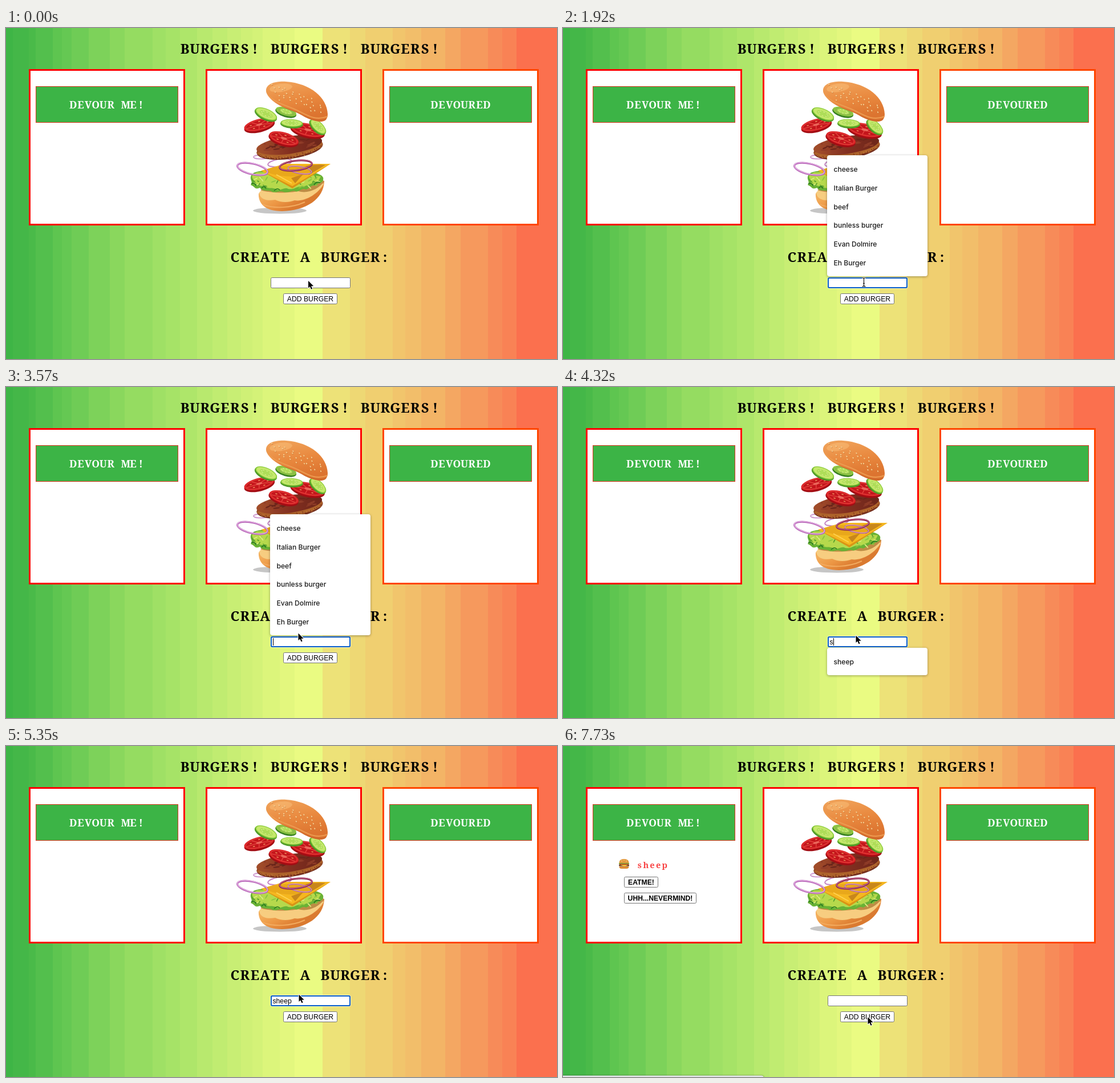
An HTML page with a canvas for the animation above (8000 ms loop, 966 by 580 pixels).

```html
<!DOCTYPE html>
<html lang="en">
<head>
<meta charset="utf-8">
<title>Burgers</title>
<style>
html, body { margin: 0; width: 100%; height: 100%; overflow: hidden; }
canvas { display: block; }
</style>
</head>
<body>
<canvas id="stage" width="966" height="580"></canvas>
<script>
const W = 966, H = 580, LOOP = 8000;
const stage = document.getElementById('stage');
const page = document.createElement('canvas');
page.width = W;
page.height = H;
let c = page.getContext('2d');

const SLAB = '"Noto Serif", serif';
const SANS = '"Liberation Sans", Arial, sans-serif';
const UI = 'Inter, Roboto, sans-serif';

// ---- helpers ----
function rect(x, y, w, h, fill) {
  c.fillStyle = fill;
  c.fillRect(x, y, w, h);
}

function rounded(x, y, w, h, r, fill, stroke, line = 1) {
  c.beginPath();
  c.roundRect(x, y, w, h, r);
  if (fill) { c.fillStyle = fill; c.fill(); }
  if (stroke) { c.strokeStyle = stroke; c.lineWidth = line; c.stroke(); }
}

function text(s, x, y, font, fill = '#000', align = 'left') {
  c.font = font;
  c.fillStyle = fill;
  c.textAlign = align;
  c.fillText(s, x, y);
}

// Slab letters set on a typewriter's fixed pitch, centred on x
function typewriter(s, x, y, size, fill = '#000') {
  const pitch = size * 0.6;
  [...s].forEach((ch, i) => {
    text(ch, x + (i + 0.5 - s.length / 2) * pitch, y, `bold ${size * 0.8}px ${SLAB}`, fill, 'center');
  });
}

function oval(x, y, rx, ry, deg, fill, stroke, line = 1) {
  c.beginPath();
  c.ellipse(x, y, rx, ry, deg * Math.PI / 180, 0, Math.PI * 2);
  if (fill) { c.fillStyle = fill; c.fill(); }
  if (stroke) { c.strokeStyle = stroke; c.lineWidth = line; c.stroke(); }
}

function shape(d, fill, stroke, line = 1) {
  const p = new Path2D(d);
  if (fill) { c.fillStyle = fill; c.fill(p); }
  if (stroke) { c.strokeStyle = stroke; c.lineWidth = line; c.stroke(p); }
}

function ramp(x0, y0, x1, y1, ...colors) {
  const g = c.createLinearGradient(x0, y0, x1, y1);
  colors.forEach((k, i) => g.addColorStop(i / (colors.length - 1), k));
  return g;
}

function local(x, y, deg, draw) {
  c.save();
  c.translate(x, y);
  c.rotate(deg * Math.PI / 180);
  draw();
  c.restore();
}

function seeded(seed) {
  return () => (seed = (seed * 16807) % 2147483647) / 2147483647;
}

// Last entry whose start time has passed
function at(list, t) {
  let hit = list[0];
  for (const e of list) if (e[0] <= t) hit = e;
  return hit;
}

// ---- background ----
const stops = [
  [0, 60, 180, 70], [46, 74, 186, 73], [100, 98, 199, 82], [200, 140, 216, 94],
  [300, 168, 228, 104], [400, 200, 238, 116], [480, 224, 246, 124],
  [532, 234, 251, 130], [562, 236, 230, 122], [650, 240, 208, 112],
  [750, 243, 180, 102], [850, 247, 142, 90], [930, 251, 112, 78], [966, 251, 112, 78]
];
const edges = [0, 12, 40, 52, 82, 98, 115, 145, 182, 208, 257, 280, 305, 335,
  362, 388, 412, 432, 450, 480, 506, 555, 603, 630, 678, 700,
  728, 770, 797, 845, 870, 895, W];

function shade(x) {
  const i = stops.findIndex(s => s[0] >= x);
  const a = stops[i - 1], b = stops[i];
  const k = (x - a[0]) / (b[0] - a[0]);
  return `rgb(${[1, 2, 3].map(n => Math.round(a[n] + (b[n] - a[n]) * k))})`;
}

function background() {
  for (let i = 1; i < edges.length; i++) {
    const x = edges[i - 1];
    rect(x, 0, edges[i] - x, H, shade((x + edges[i]) / 2));
  }
}

// ---- burger picture ----
function cucumber(x, y, rx, ry, deg, face = '#c5e86c', rim = '#4f9a28') {
  local(x, y, deg, () => {
    oval(0, 1.4, rx, ry, 0, rim);
    oval(0, -0.6, rx - 0.6, ry - 0.8, 0, '#8ccc3c');
    oval(0, -0.6, rx - 2.6, ry - 2, 0, face);
    oval(0, -0.6, rx * 0.58, ry * 0.5, 0, '#aedd58');
    for (let i = 0; i < 8; i++) {
      const a = i * Math.PI / 4;
      oval(Math.cos(a) * rx * 0.42, Math.sin(a) * ry * 0.36 - 0.6, 1.5, 0.6, 0, '#dcf093');
    }
  });
}

function tomato(x, y, rx, ry, deg) {
  local(x, y, deg, () => {
    oval(0, 1.8, rx, ry, 0, '#a30d14');
    oval(0, -0.6, rx - 0.5, ry - 1, 0, '#dd2426');
    oval(0, -0.6, rx - 3.5, ry - 3, 0, '#c4151b', '#e8504a', 0.7);
    for (let i = 0; i < 5; i++) {
      const a = i * Math.PI * 0.4 + 0.4;
      c.strokeStyle = '#e2403c';
      c.lineWidth = 1.6;
      c.beginPath();
      c.moveTo(0, -0.6);
      c.lineTo(Math.cos(a) * (rx - 4), Math.sin(a) * (ry - 3.5) - 0.6);
      c.stroke();
      const b = a + 0.63;
      oval(Math.cos(b) * rx * 0.58, Math.sin(b) * ry * 0.5 - 0.6, 2, 0.7, 0, '#f09a62');
    }
    oval(0, -0.6, rx * 0.2, ry * 0.18, 0, '#ea665a');
  });
}

function onion(x, y, rx, ry, deg, dark, light, line) {
  oval(x, y, rx, ry, deg, null, dark, line);
  oval(x, y - 0.6, rx, ry, deg, null, light, line * 0.4);
}

function bottomBun() {
  oval(480, 320, 47, 5.5, 0, '#c6c6c6');
  shape('M443 290C442 306 452 321 484 321C526 320 557 300 558 268C530 264 460 272 443 290Z',
    ramp(470, 285, 490, 322, '#f3ae5c', '#ec9644', '#da7a30'));
  shape('M444 288C445 302 460 303 472 301C482 306 495 306 506 302C522 305 547 292 557 273C540 262 460 270 444 288Z', '#f7cd80');
  shape('M446 284C460 289 495 290 512 286C530 291 548 282 558 269L552 263L460 272Z', '#bd8c45');
  shape('M450 309C468 317 500 316 524 305', null, '#f2aa5e', 2);
}

function lettuce() {
  shape('M430 258C426 266 434 268 429 275C437 278 436 284 445 280C452 288 459 283 465 286C472 291 479 284 486 287C495 290 501 284 507 286C514 289 518 279 526 283C532 281 536 274 543 276C548 271 558 272 556 262C552 252 520 250 490 250C460 250 436 248 430 258Z', '#69b235');
  shape('M432 258C430 265 438 266 434 273C444 272 444 279 453 276C460 284 468 278 474 283C482 286 488 278 495 282C506 284 510 276 520 278C530 276 537 270 547 269L552 260L490 252L440 253Z', '#b6d94c');
  const rnd = seeded(41);
  for (let i = 0; i < 36; i++) {
    const x = 434 + rnd() * 116;
    const y = 261 + rnd() * 18;
    oval(x, y, 1.5 + rnd() * 3.5, 1, rnd() * 140 - 70, ['#5aa02f', '#d8ec80', '#8cc540'][i % 3]);
  }
  shape('M430 273q6-3 9 4M448 281q4-6 8 0M470 285q6-6 10-1M540 275q4-7 11-4', null, '#27791f', 1.6);
}

function cheese() {
  shape('M447 250L489 238L569 238L502 281Z', '#f5b720');
  shape('M447 250L502 277L569 238L502 281Z', '#d99416');
  shape('M453 249C470 242 500 240 548 242C538 253 524 259 508 260C490 261 462 258 453 249Z', '#e9a81b');
  shape('M524 242C538 239 553 239 560 240L530 258C536 250 536 245 524 242Z', '#c8861b');
  shape('M500 263L521 256L507 272Z', '#c8861b');
  shape('M474 257L501 272', null, '#ffd250', 2);
}

function patty() {
  local(497, 208, -8, () => {
    oval(0, 3.5, 58.5, 18, 0, '#74301f');
    oval(0, 2, 58, 16.5, 0, '#ad622a');
    oval(0, -3, 58, 15.5, 0, ramp(-50, 0, 50, 0, '#a04c2a', '#832f20', '#6f271b'));
    const rnd = seeded(77);
    for (let i = 0; i < 70; i++) {
      const a = i * 0.0475;
      oval(Math.cos(a) * 57, 3 + Math.sin(a) * (12 + rnd() * 5), 1.5, 0.8, rnd() * 60,
        i % 2 ? '#85391f' : '#bd7634');
    }
    for (let i = 0; i < 26; i++) {
      oval(rnd() * 94 - 47, rnd() * 18 - 12, 2 + rnd() * 5, 1.2, rnd() * 40 - 20,
        i % 2 ? '#8f3c28' : '#69251b');
    }
  });
}

function topBun() {
  const d = 'M456 111C455 97 473 93 491 94C534 97 563 122 564 151C564 160 559 165 548 164C528 161 519 151 502 145C482 138 460 127 456 111Z';
  shape(d, ramp(500, 94, 512, 158, '#efa057', '#e9893f', '#dc7430'));
  c.save();
  c.clip(new Path2D(d));
  shape('M456 112C464 130 494 136 512 145C530 154 543 163 564 155', null, '#ec9a50', 2);
  shape('M455 117C466 136 494 141 511 149C527 157 541 166 564 160', null, '#cf692b', 2.5);
  oval(482, 105, 20, 7, -8, 'rgba(255,205,137,.35)');
  const rnd = seeded(19);
  for (let row = 0; row < 5; row++) {
    for (let i = 0; i < 9; i++) {
      const x = 466 + i * 11 + row * 3 + rnd() * 5;
      const y = 97 + row * 7 + i * 4 + rnd() * 4;
      const arch = 95 + Math.pow(Math.max(0, x - 485), 2) / 120;
      if (y < arch + 3 || y > 120 + (x - 460) * 0.34) continue;
      oval(x + 0.4, y + 0.6, 1.6, 1, 25 + i * 6, '#c46c2b');
      oval(x, y, 1.5, 0.9, 25 + i * 6, '#f9d79a');
    }
  }
  c.restore();
}

function burger() {
  bottomBun();
  lettuce();
  onion(480, 236, 21, 6.5, -9, '#b873b8', '#e5b9e3', 2);
  cheese();
  onion(447, 226, 13, 3.4, 0, '#c68ac5', '#ecd0eb', 1.7);
  onion(432, 247, 27, 9.3, 13, '#b665b7', '#e9b7e7', 3.2);
  onion(515, 249, 21, 6, 10, '#b263a6', '#e3a7ce', 2);
  onion(508, 241, 28.5, 8.5, -7, '#8a2853', '#c7688f', 3.2);
  patty();
  cucumber(491, 147, 19, 8, 16, '#8cbd48', '#397f24');
  tomato(529, 179, 31, 12, 13);
  cucumber(547, 173, 18, 9, 43);
  tomato(444, 170, 27.5, 11, -14);
  tomato(487, 194, 27, 11.5, 16);
  cucumber(456, 151, 21, 9.5, 24);
  cucumber(501, 167, 20, 7.5, 3);
  topBun();
}

// ---- page ----
function panel(x, border, label) {
  rect(x, 72, 274, 274, border);
  rect(x + 3, 75, 268, 268, '#fff');
  if (!label) return;
  rect(x + 12, 102, 250, 64, '#e2321f');
  rect(x + 13, 103, 248, 62, '#3cb446');
  typewriter(label, x + 137, 141, 21.94, '#fff');
}

function buildPage() {
  background();
  typewriter('BURGERS! BURGERS! BURGERS!', 533, 45, 29.26);
  typewriter('CREATE A BURGER:', 533, 410, 29.26);
  panel(40, '#f00', 'DEVOUR ME!');
  panel(350, '#f00');
  panel(660, '#ff4500', 'DEVOURED');
  burger();
}

// ---- moving parts ----
function button(x, y, w, label, fill, weight = 'normal') {
  rounded(x + 0.5, y + 0.5, w - 1, 18, 2, fill, '#767676');
  text(label, x + w / 2, y + 14, `${weight} 12.2px ${SANS}`, '#000', 'center');
}

function input(value, focus, caret) {
  rounded(464.5, 437.5, 139, 18, 2, '#fff', '#767676');
  if (focus) {
    rounded(463.5, 436.5, 141, 20, 3, null, 'rgba(255,255,255,.5)');
    rounded(465, 438, 138, 17, 2, null, '#0b5fcc', 2);
  }
  text(value, 467.5, 451, `12.2px ${SANS}`);
  if (caret) rect(Math.round(467.6 + c.measureText(value).width), 440, 1, 13, '#000');
}

function popup(y, h, items, active) {
  c.save();
  c.shadowColor = 'rgba(0,0,0,.35)';
  c.shadowBlur = 4;
  c.shadowOffsetY = 1;
  rounded(463, y, 176, h, 4, '#fff');
  c.restore();
  items.forEach((s, i) => {
    if (i === active) rect(463, y + 8 + i * 32.9, 176, 32.9, '#e8e8e8');
    text(s, 474.5, y + 28.7 + i * 32.9, `500 12.1px ${UI}`, '#1c1c1c');
  });
}

function arrow(x, y) {
  c.save();
  c.translate(x, y);
  c.lineJoin = 'round';
  const d = 'M0 0V12.6L2.9 9.9L5 14.8L7.1 13.9L5 9.2H9.2Z';
  shape(d, null, '#fff', 2);
  shape(d, '#000');
  c.restore();
}

function beam(x, y) {
  c.save();
  c.translate(x, y);
  const d = 'M-3 -7.5Q0 -7.5 0 -5.5Q0 -7.5 3 -7.5M0 -5.5V6M-3 8Q0 8 0 6Q0 8 3 8M-1.5 2.5H1.5';
  shape(d, null, 'rgba(255,255,255,.9)', 2.6);
  shape(d, null, '#111', 1.2);
  c.restore();
}

function smallBurger() {
  shape('M98.5 206C98 200 102 198 107 198C112 198 116 200 115.5 206Z', '#e39a3e');
  rect(98, 205, 18, 2, '#7cb33a');
  rect(99, 206.5, 16, 1.5, '#d8402a');
  rounded(98, 207.5, 18, 3, 1.5, '#5b2a18');
  shape('M99 208H115L108 211Z', '#f8c02c');
  rounded(98.5, 211, 17, 4, [0, 0, 4, 4], '#dc8d36');
  for (const [x, y] of [[103, 201.5], [107, 200], [111, 201.5]]) oval(x, y, 1, 0.6, 0, '#fbe3ae');
}

function order() {
  smallBurger();
  typewriter('sheep', 156.3, 213.5, 18.28, '#f84343');
  button(107, 229, 60, 'EATME!', '#fff', 'bold');
  button(107, 257, 127, 'UHH...NEVERMIND!', '#fff', 'bold');
}

function statusBar() {
  c.save();
  c.shadowColor = 'rgba(0,0,0,.4)';
  c.shadowBlur = 3;
  rounded(-4, 577.5, 356, 8, [0, 4, 0, 0], '#e3e5e8');
  c.restore();
}

const past = ['cheese', 'Italian Burger', 'beef', 'bunless burger', 'Evan Dolmire', 'Eh Burger'];
const pointer = [
  [0, arrow, 530, 443], [150, arrow, 529.5, 448.5], [450, arrow, 529.5, 447],
  [1170, beam, 527.5, 445], [3270, arrow, 512, 407], [3420, arrow, 512, 420],
  [3570, arrow, 512.5, 431.5], [3720, arrow, 513, 434], [3870, arrow, 513.5, 435.5],
  [5950, beam, 517, 446], [6100, arrow, 526, 463], [6250, arrow, 533, 473],
  [6390, arrow, 534.5, 475]
];
const typed = [[0, ''], [4320, 's'], [4460, 'sh'], [4610, 'she'], [4750, 'shee'], [4900, 'sheep'], [7730, '']];
const caret = [[0, 0], [1170, 1], [1920, 0], [2520, 1], [2970, 0], [3420, 1], [3870, 0],
  [4320, 1], [5350, 0], [5800, 1], [6250, 0]];
const buttonFill = [[0, '#fff'], [6250, '#e5e5e5'], [6530, '#f5f5f5'], [6680, '#e5e5e5'], [7730, '#fff']];

function draw(t) {
  c.drawImage(page, 0, 0);
  if (t >= 7730) order();
  input(at(typed, t)[1], t >= 1170 && t < 6530, at(caret, t)[1]);
  button(486, 465, 95, 'ADD BURGER', at(buttonFill, t)[1]);
  if (t >= 1620 && t < 4320) popup(223, 212, past, t >= 3420 && t < 3570 ? 5 : -1);
  if (t >= 4320 && t < 4900) popup(457, 48, ['sheep'], -1);
  if (t >= 7430) statusBar();
  const [, cursor, x, y] = at(pointer, t);
  cursor(x, y);
}

buildPage();
c = stage.getContext('2d');
const start = performance.now();

function tick() {
  draw((performance.now() - start) % LOOP);
  requestAnimationFrame(tick);
}
tick();
</script>
</body>
</html>
```
